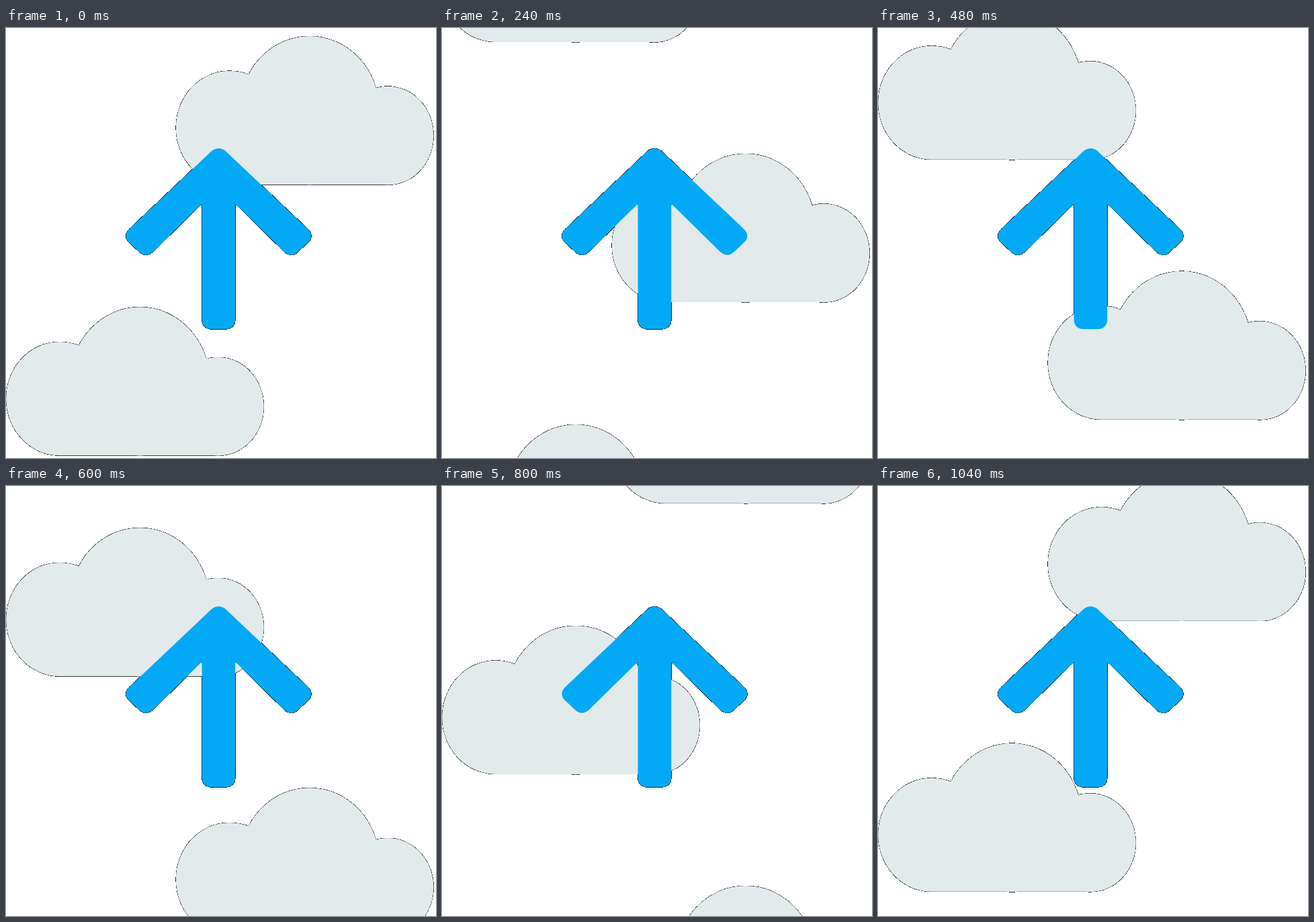
These frames come from a looping animation (640 by 640 pixels, 1080 ms). An HTML page with a canvas:

```html
<!DOCTYPE html>
<html lang="en">
<head>
<meta charset="utf-8">
<title>Upload</title>
<style>
  html, body { margin: 0; width: 100%; height: 100%; overflow: hidden; background: #fff; }
  canvas { display: block; width: 640px; height: 640px; }
</style>
</head>
<body>
<canvas id="stage" width="640" height="640"></canvas>
<script>
const SIZE = 640;
const LOOP = 1080;
const TICK = 40;
const STEP = 204 / 7;   // px the clouds fall per tick
const GAP = 790.2;      // distance between repeats of a cloud
const DIP = 0.4;        // round parts hang slightly below the flat base
const CLOUDS = [{ x: 0, base: 636.343 }, { x: 252.7, base: 233.143 }];

const ctx = document.getElementById('stage').getContext('2d', { willReadFrequently: true });

function lobe(x, bottom, rx, ry) {
  ctx.moveTo(x + rx, bottom - ry);
  ctx.ellipse(x, bottom - ry, rx, ry, 0, 0, Math.PI * 2);
}

function cloud(x, base) {
  ctx.fillStyle = '#e2eaeb';
  ctx.beginPath();
  lobe(x + 80, base, 79.9, 84.7);
  lobe(x + 199.2, base + DIP, 104, 110.75);
  lobe(x + 315.6, base + DIP, 68.2, 73.4);
  ctx.rect(x + 80, base - 110, 235.6, 110);
  ctx.fill();
}

// Half of the arrow, mirrored around its axis for the other side.
function halfArrow(side) {
  ctx.save();
  ctx.translate(316.4, 0);
  ctx.scale(side, 1);
  ctx.moveTo(0.5, 179.3);
  ctx.lineTo(0, 179.3);
  ctx.bezierCurveTo(-4, 179.3, -8, 180.8, -11, 183.8);
  ctx.lineTo(-132.5, 298.8);
  ctx.bezierCurveTo(-139.5, 305.2, -139.5, 312.5, -134, 318.5);
  ctx.lineTo(-119, 332.5);
  ctx.bezierCurveTo(-112.5, 339.5, -104.5, 339.5, -97.5, 333);
  ctx.lineTo(-26.8, 263.5);
  ctx.quadraticCurveTo(-24.8, 262, -24.8, 265);
  ctx.lineTo(-24.8, 434.5);
  ctx.bezierCurveTo(-24.8, 443, -18.7, 448.3, -10.5, 448.3);
  ctx.lineTo(0.5, 448.3);
  ctx.closePath();
  ctx.restore();
}

function arrow() {
  ctx.fillStyle = '#04a9f5';
  for (const side of [1, -1]) {
    ctx.beginPath();
    halfArrow(side);
    ctx.fill();
  }
}

// Soft edge pixels blend to black, giving the hairline outline.
function darkenEdges() {
  const img = ctx.getImageData(0, 0, SIZE, SIZE);
  const px = img.data;
  for (let i = 0; i < px.length; i += 4) {
    const a = px[i + 3];
    if (a === 255) continue;
    const k = a / 255;
    const empty = a < 10;
    for (let c = i; c < i + 3; c++) px[c] = empty ? 255 : px[c] * k;
    px[i + 3] = 255;
  }
  ctx.putImageData(img, 0, 0);
}

function draw(tick) {
  ctx.clearRect(0, 0, SIZE, SIZE);
  for (const { x, base } of CLOUDS) {
    const y = base + tick * STEP;
    cloud(x, y);
    cloud(x, y - GAP);
  }
  arrow();
  darkenEdges();
}

const start = performance.now();
let shown = 0;

function frame() {
  const t = (performance.now() - start + 1) % LOOP;
  const tick = Math.floor(t / TICK);
  if (tick !== shown) draw(shown = tick);
  requestAnimationFrame(frame);
}

draw(0);
requestAnimationFrame(frame);
</script>
</body>
</html>
```
